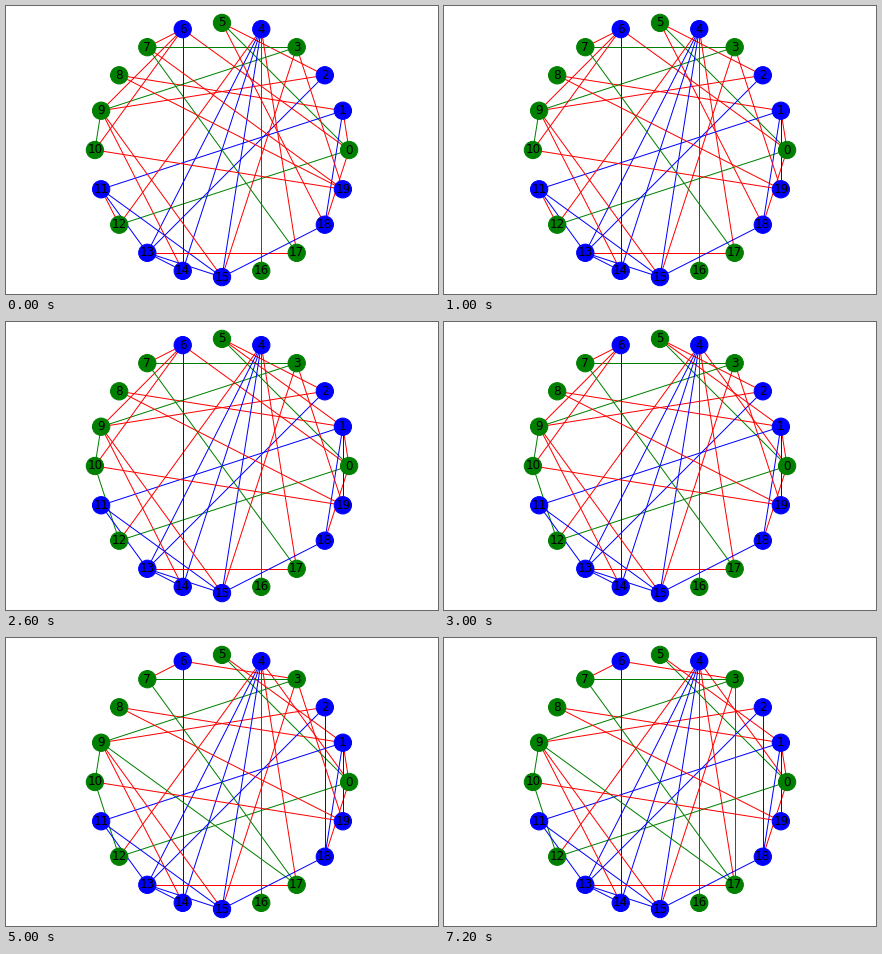
Recreate the animation shown at these times as a matplotlib script. Size 432 by 288 pixels, loop 8000 ms.

```python
import numpy as np
import matplotlib.pyplot as plt
from matplotlib.animation import FuncAnimation
from matplotlib.collections import LineCollection

W, H, DPI = 432, 288, 72
COUNT = 20
RADIUS = 127.09
GROUPS = "GBBGBGBGGGGBGBBBGGBB"
COLORS = {"G": "green", "B": "blue"}

angles = 2 * np.pi * np.arange(COUNT) / COUNT
nodes = np.column_stack([W / 2 + RADIUS * np.cos(angles),
                         H / 2 + RADIUS * np.sin(angles)])

# Each hub links to an evenly spaced run of nodes.
FANS = [
    (0, range(1, 6, 4)), (0, range(6, 19, 6)),
    (1, range(8, 12, 3)), (2, range(5, 14, 4)),
    (3, range(7, 10, 2)), (4, range(12, 18)),
    (6, range(7, 15, 7)), (6, range(9, 11)),
    (7, [17]), (9, range(10, 15, 4)),
    (15, range(3, 10, 6)), (15, [18]),
    (18, range(1, 6, 4)),
    (19, range(3, 8, 4)), (19, range(8, 11, 2)),
]
FANS += [(hub, [hub + 2 ** k for k in range(3)]) for hub in (11, 13)]

# (second, node, dropped neighbour, new neighbour)
REWIRINGS = [
    (1, 19, 7, 1),
    (2, 12, 11, 10), (2, 5, 18, 1),
    (3, 0, 6, 4),
    (4, 9, 6, 17), (4, 2, 5, 18),
    (5, 6, 10, 3),
    (6, 3, 19, 17),
]


def link(a, b):
    return min(a, b), max(a, b)


def edges_at(second):
    edges = {link(hub, end) for hub, ends in FANS for end in ends}
    for start, node, dropped, added in REWIRINGS:
        if start <= second:
            edges.remove(link(node, dropped))
            edges.add(link(node, added))
    return sorted(edges)


def edge_color(a, b):
    return COLORS[GROUPS[a]] if GROUPS[a] == GROUPS[b] else "red"


fig = plt.figure(figsize=(W / DPI, H / DPI), dpi=DPI, facecolor="white")
ax = fig.add_axes([0, 0, 1, 1])
ax.set(xlim=(0, W), ylim=(0, H))
ax.axis("off")

lines = LineCollection([], linewidths=1, zorder=1)
ax.add_collection(lines)
ax.scatter(*nodes.T, s=300, c=[COLORS[g] for g in GROUPS],
           linewidths=1, zorder=2)
for n, (x, y) in enumerate(nodes):
    ax.text(x, y, str(n), size=12, family="DejaVu Sans",
            ha="center", va="center", zorder=3)


def draw(second):
    edges = edges_at(second)
    lines.set_segments([nodes[list(edge)] for edge in edges])
    lines.set_color([edge_color(*edge) for edge in edges])
    return [lines]


anim = FuncAnimation(fig, draw, frames=8, interval=1000, repeat=True,
                     repeat_delay=0)
plt.show()
```
